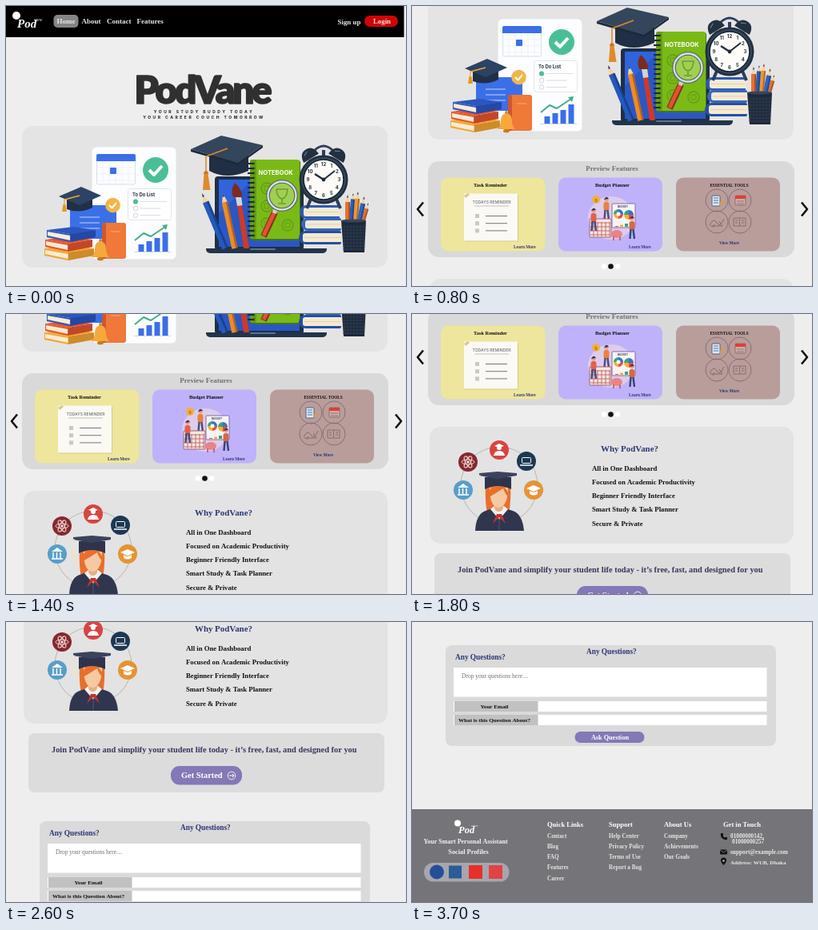
An HTML page with a canvas that plays this animation: 500x350 px, repeating every 3.8 s.

```html
<!DOCTYPE html>
<html lang="en">
<head>
<meta charset="utf-8">
<title>Study site scroll</title>
<style>
html, body { margin: 0; width: 100%; height: 100%; overflow: hidden; background: #eee; }
canvas { display: block; }
</style>
</head>
<body>
<canvas id="stage" width="500" height="350"></canvas>
<script>
const STEP = 100, LOOP = 3800, SHIFT = 20, PAGE = 1090;
const SERIF = '"Liberation Serif", "Noto Serif", serif';
const SANS = 'Inter, "Open Sans", sans-serif';
const NAVY = '#2b3f5c', BLUE = '#3b6fe8', GOLD = '#f2a830', INK = '#2b3674', LILAC = '#8478b6';

const page = document.createElement('canvas');
page.width = 500;
page.height = PAGE;
const c = page.getContext('2d');

function box(x, y, w, h, r, fill, stroke) {
  c.beginPath();
  c.roundRect(x, y, w, h, r);
  paint(fill, stroke);
}
function disc(x, y, r, fill, stroke, lw) {
  c.beginPath();
  c.arc(x, y, r, 0, 7);
  paint(fill, stroke, lw);
}
function oval(x, y, rx, ry, fill) {
  c.beginPath();
  c.ellipse(x, y, rx, ry, 0, 0, 7);
  paint(fill);
}
function trace(pts) {
  c.beginPath();
  for (let i = 0; i < pts.length; i += 2) c.lineTo(pts[i], pts[i + 1]);
}
function poly(fill, ...pts) {
  trace(pts);
  paint(fill);
}
function line(color, lw, ...pts) {
  trace(pts);
  paint(null, color, lw);
}
function path(d, fill, stroke, lw) {
  const p = new Path2D(d);
  if (fill) { c.fillStyle = fill; c.fill(p); }
  if (stroke) { c.strokeStyle = stroke; c.lineWidth = lw || 1; c.stroke(p); }
}
function paint(fill, stroke, lw = 1) {
  if (fill) { c.fillStyle = fill; c.fill(); }
  if (stroke) { c.strokeStyle = stroke; c.lineWidth = lw; c.stroke(); }
}
function text(s, x, y, size, color, opt = {}) {
  c.font = `${opt.style || 'bold'} ${size}px ${opt.family || SERIF}`;
  c.letterSpacing = (opt.gap || 0) + 'px';
  c.textAlign = opt.align || 'left';
  c.fillStyle = c.strokeStyle = color;
  c.fillText(s, x, y);
  if (opt.outline) {
    c.lineWidth = opt.outline;
    c.strokeText(s, x, y);
  }
}
const mid = (s, x, y, size, color, opt) => text(s, x, y, size, color, { ...opt, align: 'center' });
function at(x, y, angle, draw) {
  c.save();
  c.translate(x, y);
  c.rotate(angle);
  draw();
  c.restore();
}

function pencil(x, y, x2, y2, w, color) {
  const len = Math.hypot(x2 - x, y2 - y);
  at(x, y, Math.atan2(y2 - y, x2 - x) - Math.PI / 2, () => {
    poly('#f4d3a2', 0, 0, w / 2, w * 1.7, -w / 2, w * 1.7);
    poly(NAVY, 0, 0, w / 6, w * .6, -w / 6, w * .6);
    box(-w / 2, w * 1.5, w, len - w * 1.5, 0, color);
    box(w / 6, w * 1.5, w / 3, len - w * 1.5, 0, 'rgba(0,0,40,.28)');
  });
}
function book(x, y, w, h, color) {
  box(x, y, w, h, [h / 2, 2, 2, h / 2], color);
  box(x + 5, y + 3, w - 5, h - 6, [3, 0, 0, 3], '#f4ead2');
  line('#d0c3a4', .6, x + 7, y + h / 2, x + w - 1, y + h / 2);
}
// Book lying flat, seen from its corner: pages on the left face, spine on the right.
function slab(x, y, w, color) {
  const m = x + w * .48, r = x + w;
  poly(color, x, y + 4, m, y + 9, m, y + 19, x, y + 13);
  poly('#f7ecd4', x + 1, y + 6, m, y + 11, m, y + 17, x + 1, y + 11);
  poly(color, m, y + 9, r, y + 4, r, y + 13, m, y + 19);
  poly('rgba(0,0,30,.16)', m, y + 9, r, y + 4, r, y + 13, m, y + 19);
  poly(color, x, y + 4, x + w * .55, y, r, y + 4, m, y + 9);
}

function header() {
  box(0, 0, 497.5, 39, 0, '#000');
  disc(13, 12, 5, '#fff');
  text('Pod', 14, 27, 15, '#fff', { style: 'italic bold' });
  text('vane', 35, 19, 5.5, '#ddd', { style: 'italic' });
  box(59.5, 11, 31, 16, 5, '#858585');
  text('Home', 63.5, 22, 9, '#e8e8e8');
  text('About', 94.5, 22, 9, '#e8e8e8');
  text('Contact', 126, 22, 9, '#e8e8e8');
  text('Features', 163.5, 22, 9, '#e8e8e8');
  text('Sign up', 414.5, 22.5, 8.9, '#e8e8e8');
  box(448, 12, 42, 14, 7, '#cf0505');
  mid('Login', 470, 22, 8.8, '#f5e4e4');
}

function report() {
  box(107, 176, 106, 141, 6, '#fcfdfe', '#dfe3e8');
  box(113.5, 186, 48, 37, 2, '#fbfdff', '#d3dff3');
  box(113, 185, 49, 9, [2, 2, 0, 0], BLUE);
  for (let x = 121; x < 160; x += 8) line('#e6edf7', .6, x, 194, x, 223);
  for (let y = 202; y < 222; y += 8) line('#e6edf7', .6, 114, y, 161, y);
  box(130, 202, 8, 8, 1, BLUE);
  disc(187, 205, 16, '#4abf97');
  line('#fff', 4, 179, 205, 185, 211, 195, 200);
  box(152.5, 228.5, 54, 39, 3, '#fff', '#e2e5e9');
  text('To Do List', 158, 237.5, 5.9, '#2a3442', { family: SANS });
  for (let i = 0; i < 3; i++) {
    const y = 244.5 + i * 8.5;
    disc(162, y, 2.8, i ? '#fff' : '#4abf97', i ? '#c4cad0' : '#4abf97', .8);
    line('#dde0e4', 1.2, 168, y, i ? 193 : 201, y);
  }
  [9, 13, 17, 24].forEach((h, i) => box(165.5 + i * 10, 307 - h, 7, h, 0, BLUE));
  line('#c6ccd4', .8, 160, 307.5, 206, 307.5);
  line('#3fae86', 2, 161, 293, 172, 284, 181, 288, 199, 276);
  poly('#3fae86', 202, 273, 200, 280, 195, 274);
}

function deskLeft() {
  report();
  box(80, 249, 58, 42, 3, BLUE);
  for (let y = 264; y < 282; y += 7) line('#a9c4ff', 1.2, 92, y, 117, y);
  box(120, 271, 30, 45, 3, '#f07838');
  box(120, 271, 5, 45, 2, '#cf5630');
  line('#f7a277', 1.2, 131, 282, 143, 282);
  disc(133.5, 249, 9.3, '#f3b548');
  line('#fff', 2, 129, 249, 132.5, 252.5, 138, 246);
  slab(48, 299, 62, '#f4a52e');
  slab(49, 288, 59, '#e8552c');
  slab(51, 276, 61, '#2c56be');
  path('M107 314Q111 310 111 303Q111 295 118 294Q125 295 125 303Q125 310 129 314Z', '#f6a83a');
  disc(118, 293, 2, '#d48b22');
  oval(118, 316, 4, 2.3, '#c97a20');
  path('M76 241V254Q92 260 108 252V241Z', '#1f3047');
  poly('#2c4363', 66, 238, 94, 226, 119, 237, 92, 249);
  line(GOLD, 1.3, 92, 237, 73, 242, 73, 249);
  poly('#e79524', 71.5, 248, 74.5, 248, 76, 257, 70, 257);
}

function notebook() {
  box(306, 193, 62, 100, 3, '#46751a');
  box(305, 192, 62, 99, 3, '#7aba16');
  box(305, 192, 8, 99, 3, '#659d17');
  text('NOTEBOOK', 315.5, 210.5, 7.6, '#fff', { family: SANS });
  for (const [x, y] of [[326, 228], [326, 250], [326, 272], [352, 274]]) {
    disc(x, y, 7, null, '#649b1a', 1.3);
    box(x - 3, y - 3, 6, 6, 1, null, '#649b1a');
  }
  for (let y = 197; y < 290; y += 6) {
    line('#1d2833', 2, 302, y, 309, y);
    disc(309.5, y, 1.4, '#26381b');
  }
}

function magnifier() {
  line('#8d2c1d', 8, 336, 258, 322, 288);
  line('#de5432', 5, 336, 257, 322, 287);
  line('#c9d0d4', 5, 338.5, 251.5, 335, 259);
  disc(345, 237, 17.5, 'rgba(215,240,180,.4)', '#4c5b66', 4.5);
  disc(345, 237, 17.5, null, '#d8dfe3', 2.4);
  path('M338 229H352Q351 240 345 241Q339 240 338 229M345 241V246M340 247H350', null, '#6a9e22', 1.6);
}

function clock(x, y) {
  line(NAVY, 4, x - 15, y + 22, x - 21, y + 36);
  line(NAVY, 4, x + 15, y + 22, x + 21, y + 36);
  path(`M${x - 12} ${y - 36}Q${x} ${y - 48} ${x + 12} ${y - 36}`, null, NAVY, 3);
  for (const s of [-1, 1]) at(x + s * 18, y - 31, s * .55, () => {
    path('M-11 5Q-10 -8 0 -8Q10 -8 11 5Z', '#22313f');
    line('#6c7d8e', 1.2, -6, -2, 0, -5);
  });
  line(NAVY, 4, x, y - 28, x, y - 37);
  disc(x, y, 30.5, '#1f2f40');
  disc(x, y, 28, '#34475b');
  disc(x, y, 25, '#fdfcf8', '#17232f', 1.6);
  for (let h = 1; h <= 12; h++) {
    const a = h * Math.PI / 6;
    mid(h, x + 19.5 * Math.sin(a), y - 19.5 * Math.cos(a) + 2.2, 6, '#29323c', { family: SANS });
  }
  line('#202b37', 2.4, x, y, x - 11, y - 7);
  line('#202b37', 2, x, y, x + 14, y - 11);
  disc(x, y, 2.4, '#202b37');
}

function deskRight() {
  box(261, 213, 111, 92, 4, '#1e2f46');
  box(266, 217, 101, 84, 1, '#2f64dd');
  poly('#2a57c4', 266, 301, 266, 260, 308, 217, 367, 217, 367, 301);
  box(250, 303, 151, 6, [0, 0, 5, 5], '#22344b');
  box(305, 303, 32, 2, 1, '#60738b');
  pencil(245, 234, 274, 303, 8, '#2459bd');
  pencil(271, 234, 286, 303, 7.5, '#ee8b27');
  poly('#cf3a26', 289, 249, 295, 249, 304, 303, 297, 303);
  poly('#cfd4d6', 287, 239, 294, 238, 295.5, 249, 289, 250);
  path('M284 239Q280 230 286 221Q296 230 295 239Z', '#7d2b1d');
  notebook();
  book(367, 249, 50, 17, '#2f5ab2');
  book(369, 265, 50, 16, '#3767bd');
  book(366, 281, 53, 17, '#264f9f');
  magnifier();
  clock(397, 217);
  pencil(453, 246, 444, 276, 5, '#e2702a');
  pencil(448, 238, 440, 276, 6, '#2e65c8');
  pencil(440, 232, 436, 276, 6, '#f0952c');
  pencil(434, 234, 431, 276, 5, '#2a5bb8');
  pencil(427, 236, 427, 276, 6, '#e8722a');
  path('M419 268H450L448 308H422Z', '#1d2939');
  for (let x = 423; x < 448; x += 4) line('#34445a', .7, x, 273, x, 305);
  for (let y = 276; y < 306; y += 4) line('#34445a', .7, 421, y, 448, y);
  oval(434.5, 268.5, 15.5, 2, '#35455a');
  path('M254 183V206Q276 218 303 206V181Z', '#202f43');
  poly('#1d2a3b', 231, 179, 290, 196, 321, 174, 321, 177, 290, 199, 231, 182);
  poly('#34465c', 231, 179, 269, 162, 321, 174, 290, 196);
  line('#e08a2c', 1.6, 277, 178, 250, 188, 250, 208);
  disc(250, 209, 2.8, '#c9761f');
  poly('#e2892a', 247.5, 210, 252.5, 210, 255.5, 230, 246, 230);
}

function hero() {
  mid('PodVane', 245, 122, 47.5, '#303030', { style: '900', family: 'Lato, Inter, sans-serif', gap: -3.2, outline: 1.6 });
  const tag = { family: SANS, gap: 2.5, style: '800' };
  mid('YOUR STUDY BUDDY TODAY', 247.5, 134.3, 5, '#333', tag);
  mid('YOUR CAREER COUCH TOMORROW', 247.5, 141, 5, '#333', tag);
  box(20, 150, 457, 177, 14, '#e4e4e4');
  deskLeft();
  deskRight();
}

function reminder() {
  box(66, 395.5, 67, 59, 0, '#d2cb8d');
  box(65, 394.5, 67, 59, 0, '#faf9f4');
  poly('#d9c98e', 65, 397, 70, 394, 72, 396, 67, 400);
  mid('TODAYS REMINDER', 99.5, 406.8, 5.1, '#55585a', { style: 'normal', family: SANS });
  line('#b5b6b2', .8, 78, 410, 121, 410);
  for (let y = 422.5; y < 445; y += 9.2) {
    box(79, y - 2.5, 5, 5, 0, '#c8c8c4');
    line('#777', 1, 92, y, 119, y);
  }
}

function person(x, y, top, legs) {
  disc(x, y, 2.6, '#e9a184');
  path(`M${x - 3} ${y}Q${x} ${y - 6} ${x + 3} ${y - 1}Z`, '#3b3154');
  box(x - 3.5, y + 3, 7, 11, 3, top);
  line(legs, 2.4, x - 1.5, y + 13, x - 2.5, y + 25);
  line(legs, 2.4, x + 1.5, y + 13, x + 3, y + 25);
}
function budget() {
  oval(249, 425, 29, 27, '#dccdec');
  person(243, 402, '#e8823c', '#4d4a78');
  box(250, 407, 29, 30, 1, '#f8f4f5', '#826da9');
  text('BUDGET', 257, 412, 3.2, '#3b376c', { family: SANS });
  ['#e84e3d', '#f3af38', '#39a37b', '#3b70ca'].forEach((color, i) => {
    const a = i * Math.PI / 2;
    for (const [x, y, r] of [[258, 420, 6], [271, 421, 6]]) {
      c.beginPath();
      c.moveTo(x, y);
      c.arc(x, y, r, a, a + Math.PI / 2);
      paint(color);
    }
    box(254 + i * 6, 435 - i * 1.5, 4, 1 + i * 1.5, 0, color);
  });
  disc(258, 420, 2.5, '#fff');
  disc(230, 402, 5, '#f2b136');
  mid('$', 230, 404.5, 7, '#a6631d');
  box(222, 426, 27, 23, 1, '#f6e6df', '#a0607a');
  for (let x = 227; x < 249; x += 5) line('#c06f72', 1, x, 430, x, 448);
  for (let y = 431; y < 449; y += 5) line('#c06f72', 1, 223, y, 248, y);
  person(227, 416, '#e65e49', '#3b4a86');
  person(275, 426, '#d8674a', '#344574');
  oval(256, 445, 7, 5, '#e98387');
  box(251, 448, 2, 5, 0, '#cc686f');
  box(259, 448, 2, 5, 0, '#cc686f');
}

function tools() {
  const pen = '#846a6c';
  for (const x of [381, 410]) for (const y of [403, 430]) disc(x, y, 14, null, pen, .9);
  box(375, 397, 10, 13, 1, '#e3e7ea', '#47678e');
  for (let y = 400; y < 409; y += 3) line('#3979bd', 1, 377, y, 383, y);
  line('#ef9630', 2, 388, 402, 385, 409);
  box(404, 397, 13, 12, 1, '#c9aeaa', '#936d6b');
  box(404, 397, 13, 4, 1, '#dc4034');
  for (let y = 404; y < 409; y += 3) line('#8b6967', .8, 406, y, 415, y);
  path('M372 434Q377 424 381 431T390 426M373 435H388L384 429M378 433L376 437', null, pen, 1);
  path('M402 425H417V435H402ZM409.5 425V435M404 428H407M412 428H415M404 431H407M412 431H415', null, pen, .9);
}

function features() {
  box(20, 354, 458, 120, 14, '#d9d9d9');
  mid('Preview Features', 250, 365.5, 8.9, '#707070');
  box(36, 374.5, 130.5, 92, 9, '#eee69c');
  box(183, 374.5, 130, 92, 9, '#bfb2fb');
  box(330, 374.5, 130, 92, 9, '#b99d9b');
  mid('Task Reminder', 98, 386.2, 6.4, '#111');
  mid('Budget Planner', 250.5, 386.2, 6.4, '#111');
  mid('ESSENTIAL TOOLS', 396.5, 386.2, 5.2, '#111');
  reminder();
  budget();
  tools();
  text('Learn More', 127, 462.5, 5.35, INK);
  text('Learn More', 271, 462.5, 5.35, INK);
  text('View More', 384, 458, 5.3, INK);
  line('#111', 2.6, 14, 405.5, 7, 414, 14, 422.5);
  line('#111', 2.6, 487, 405.5, 494, 414, 487, 422.5);
  [240, 248.5, 257].forEach((x, i) => disc(x, 485.5, 3.3, i === 1 ? '#111' : '#fff'));
}

function student() {
  disc(109, 574, 48, null, '#b9b6ad', 1);
  const dots = [[109, 530, '#d8443f'], [70, 545, '#85282e'], [143, 544, '#1d3852'], [64, 580, '#579fc8'], [152, 580, '#e59433']];
  for (const [x, y, color] of dots) disc(x, y, 12, color);
  disc(109, 527, 3, '#fff');
  path('M102 537Q103 531 109 531Q115 531 116 537Z', '#fff');
  poly('#fff', 103, 525, 109, 522, 115, 525, 109, 527);
  for (let i = 0; i < 3; i++) at(70, 545, i * Math.PI / 3, () => {
    c.beginPath();
    c.ellipse(0, 0, 8, 3, 0, 0, 7);
    paint(null, '#f0d2cc', 1);
  });
  disc(70, 545, 1.5, '#fff');
  box(137.5, 539.5, 11, 7, 1, null, '#fff');
  line('#fff', 1.5, 135, 549, 151, 549);
  poly('#fff', 57, 577, 64, 572, 71, 577);
  for (let x = 59; x < 71; x += 4.5) line('#fff', 1.5, x, 578, x, 585);
  line('#fff', 1.6, 57, 586, 71, 586);
  poly('#fff', 143, 578, 152, 574, 161, 578, 152, 582);
  path('M147 581V585Q152 588 157 585V581L152 583Z', '#fff');
  path('M92 574Q91 594 94 609H121Q124 594 123 574Z', '#e96f2d');
  path('M79 631Q80 610 92 606L103 602H113L126 606Q138 610 140 631Z', '#31364f');
  poly('#f4f1ec', 98, 604, 109, 617, 120, 604, 115, 600, 103, 600);
  box(103, 595, 11, 12, [0, 0, 6, 6], '#e5ae86');
  path('M97 577Q97 601 108 602Q120 601 120 577Z', '#f6c9a2');
  path('M96 589Q95 575 107 574Q120 575 121 589Q116 585 114 578Q105 584 96 589Z', '#e96f2d');
  poly('#b93832', 106, 610, 112, 610, 117, 622, 109, 614, 101, 622);
  line('#51566c', 1, 109, 615, 109, 631);
  path('M91 564H124V579Q107 571 91 579Z', '#2e344c');
  poly('#3b425c', 84, 559, 107, 557, 131, 559, 131, 562, 107, 566, 84, 562);
  line('#eee4cb', 1, 85, 561, 85, 574);
  poly('#eee4cb', 84, 573, 86, 573, 87.5, 588, 82.5, 588);
}

function why() {
  box(22, 501, 455, 146, 14, '#e3e3e3');
  student();
  text('Why PodVane?', 236, 531.5, 10.9, INK);
  ['All in One Dashboard', 'Focused on Academic Productivity', 'Beginner Friendly Interface',
    'Smart Study & Task Planner', 'Secure & Private']
    .forEach((s, i) => text(s, 225, 555.5 + i * 17.25, 8.7, '#111'));
}

function join() {
  box(28, 659, 445, 74, 8, '#dcdcdc');
  text('Join PodVane and simplify your student life today - it’s free, fast, and designed for you', 57, 683, 10.36, '#37355a');
  box(206, 700, 89, 23.5, 11, LILAC);
  text('Get Started', 219, 715.3, 10.4, '#fff');
  disc(282, 712, 4.8, null, '#fff', .9);
  line('#fff', 1, 279, 712, 285, 712);
  line('#fff', 1, 283, 710, 285, 712, 283, 714);
}

function form() {
  box(42, 769, 413, 126, 8, '#dadada');
  text('Any Questions?', 54, 786.5, 9.3, INK);
  text('Any Questions?', 218, 779.5, 9.3, INK);
  box(52, 797, 391.5, 36.5, 0, '#fff');
  text('Drop your questions here....', 62, 809.5, 7.5, '#6e6e6e', { style: 'normal' });
  [['Your Email', 839], ['What is this Question About?', 856]].forEach(([s, y]) => {
    box(52, y, 391.5, 13, 0, '#fff');
    box(53, y, 104.5, 13, 0, '#c1c1c1');
    mid(s, 103, y + 9, 7.15, '#111');
  });
  box(203.5, 877, 87, 14, 7, LILAC);
  mid('Ask Question', 247.5, 887, 8.2, '#fff');
}

function footer() {
  box(0, 974, 500, 116, 0, '#757579');
  disc(57, 991.5, 4, '#fff');
  text('Pod', 58, 1003.5, 12.5, '#fff', { style: 'italic bold' });
  text('vane', 74, 996, 4.5, '#eee', { style: 'italic' });
  mid('Your Smart Personal Assistant', 67, 1016.8, 8, '#f2f2f2');
  mid('Social Profiles', 70.5, 1030, 8.3, '#f2f2f2');
  box(15, 1041, 106.5, 23.5, 11.5, '#a6a6ad');
  disc(31, 1052.5, 9, '#234f98');
  box(46, 1044.5, 16, 16, 0, '#2d5b96');
  box(71, 1044, 17, 17, 0, '#e5302b');
  box(96, 1044, 17, 17, 0, '#e24343');

  const columns = [
    [169, 'Quick Links', 'Contact', 'Blog', 'FAQ', 'Features', 'Career'],
    [246, 'Support', 'Help Center', 'Privacy Policy', 'Terms of Use', 'Report a Bug'],
    [315, 'About Us', 'Company', 'Achievements', 'Our Goals'],
    [389, 'Get in Touch']
  ];
  for (const [x, head, ...links] of columns) {
    text(head, x, 996.3, 8.5, '#fff');
    links.forEach((s, i) => text(s, x, 1009.7 + i * 13.2, 7.2, '#e4e4e4'));
  }
  text('01000000142,', 398, 1010, 7.3, '#e8e8e8');
  text('01000000257', 400, 1016.8, 7.3, '#e8e8e8');
  text('support@example.com', 398, 1030, 7.3, '#e8e8e8');
  text('Address: WUB, Dhaka', 398, 1042.8, 7.1, '#e8e8e8');
  path('M387 1005Q387 1011 393 1011', null, '#111', 2.4);
  disc(387.5, 1005.5, 1.7, '#111');
  disc(392.5, 1010.5, 1.7, '#111');
  box(385, 1024.5, 9, 6, 1, '#111');
  line('#999', .8, 385, 1025, 389.5, 1028, 394, 1025);
  path('M389.5 1044Q386 1040 386 1038A3.5 3.5 0 0 1 393 1038Q393 1040 389.5 1044Z', '#111');
  disc(389.5, 1038.5, 1.2, '#ccc');
}

c.fillStyle = '#eee';
c.fillRect(0, 0, 500, PAGE);
c.lineJoin = 'round';
[header, hero, features, why, join, form, footer].forEach(draw => draw());

const view = document.getElementById('stage').getContext('2d');
const start = performance.now();
function tick() {
  const t = (performance.now() - start) % LOOP;
  view.drawImage(page, 0, -SHIFT * Math.floor(t / STEP));
  requestAnimationFrame(tick);
}
tick();
</script>
</body>
</html>
```
